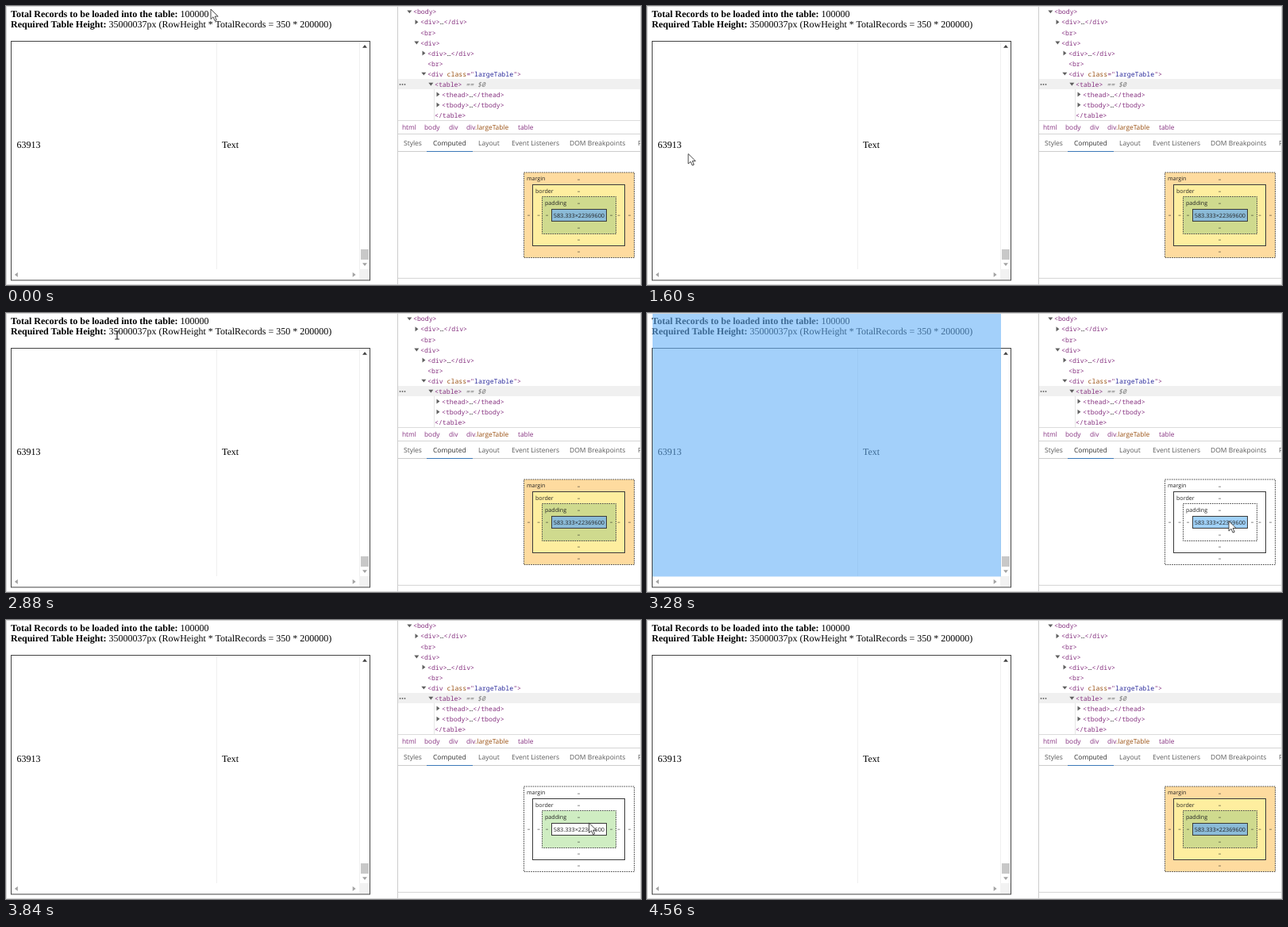
These frames come from a looping animation (800 by 352 pixels, 4640 ms). An HTML page:

```html
<!DOCTYPE html>
<html lang="en">
<head>
<meta charset="utf-8">
<title>Table height inspector</title>
<style>
  html, body { margin: 0; width: 100%; height: 100%; overflow: hidden; background: #fff; }
  svg { display: block; text-rendering: geometricPrecision; }
  text { white-space: pre; }
  .page { font: 12px "Liberation Serif", serif; }
  .code { font: 8.2px "Noto Sans Mono", monospace; fill: #85307f; }
  .crumb { font: 8.35px "Open Sans", sans-serif; fill: #85307f; }
  .tab { font: 8.5px "Open Sans", sans-serif; fill: #5a5a5a; }
  .box { font: 7.1px "Open Sans", sans-serif; fill: #222; }
  .mid { text-anchor: middle; }
  .attr { fill: #994f10; }
  .value { fill: #2a2a9c; }
  .dim { fill: #333; }
  .note { fill: #777; font-style: italic; }
</style>
</head>
<body>
<svg id="stage" width="800" height="352" viewBox="0 0 800 352"></svg>
<script>
const stage = document.getElementById('stage');
const parts = [];
const rect = (x, y, w, h, fill, more = '') =>
  parts.push(`<rect x="${x}" y="${y}" width="${w}" height="${h}" fill="${fill}" ${more}/>`);
const text = (cls, x, y, body) => parts.push(`<text class="${cls}" x="${x}" y="${y}">${body}</text>`);
const tri = (x, y, turn, size, fill) =>
  parts.push(`<path d="M-${size} -${size * .6}H${size}L0 ${size * .7}Z" fill="${fill}" transform="translate(${x} ${y}) rotate(${turn})"/>`);
const span = (cls, s) => `<tspan class="${cls}">${s}</tspan>`;
const tag = s => `&lt;${s}&gt;`;
const folded = s => tag(s) + span('dim', '…') + tag('/' + s);

// Page and table
text('page', 6, 14, '<tspan font-weight="bold">Total Records to be loaded into the table:</tspan> 100000');
text('page', 6, 27.3, '<tspan font-weight="bold">Required Table Height:</tspan> 35000037px (RowHeight * TotalRecords = 350 * 200000)');
rect(6.5, 44.5, 452, 301.5, '#fff', 'stroke="#444"');
rect(265, 45, 1, 287, '#efefef');
rect(445, 45, 1, 287, '#efefef');
text('page', 13.5, 178.6, '63913');
text('page', 272, 178.6, 'Text');
rect(445, 332, 13, 13, '#f2f2f2');
rect(447, 307, 10, 13, '#c8c8c8');
tri(452, 51, 180, 3, '#444');
tri(452, 326, 0, 3, '#a3a3a3');
tri(13, 339, 90, 3, '#a3a3a3');
tri(438.5, 339, -90, 3, '#a3a3a3');
parts.push('<rect id="shade" x="7" y="1" width="439" height="331.5" fill="#66b1f7" opacity=".6"/>');

// Element tree: indent, arrow turn (null for none), content
rect(493, 0, 307, 352, '#fff');
rect(493, 0, 1, 352, '#ccc');
rect(494, 92, 306, 13, '#f0f0f0');
rect(539, 105, 1, 39, '#e6e6e6');
const OPEN = 0, SHUT = -90;
[
  [513, OPEN, tag('body')],
  [522, SHUT, folded('div')],
  [522, null, tag('br')],
  [522, OPEN, tag('div')],
  [531, SHUT, folded('div')],
  [531, null, tag('br')],
  [531, OPEN, `&lt;div ${span('attr', 'class')}="${span('value', 'largeTable')}"&gt;`],
  [540, OPEN, tag('table') + span('note', ' == $0')],
  [549, SHUT, folded('thead')],
  [549, SHUT, folded('tbody')],
  [540, null, tag('/table')]
].forEach(([x, turn, body], i) => {
  const y = 10.4 + i * 13.05;
  text('code', x, y, body);
  if (turn !== null) tri(x - 4.7, y - 3.2, turn, 3, '#606060');
});
[496.5, 499.5, 502.5].forEach(x => parts.push(`<circle cx="${x}" cy="99" r=".9" fill="#666"/>`));

// Breadcrumbs and tabs
rect(494, 144, 306, 1, '#dcdcdc');
rect(494, 161, 306, 1, '#d4d4d4');
[[499, 'html'], [527, 'body'], [558, 'div'], [580, 'div' + span('attr', '.largeTable')], [645, 'table']]
  .forEach(([x, s]) => text('crumb', x, 156, s));
rect(494, 183, 306, 1, '#ccc');
rect(530, 183, 58, 1, '#3c78b8');
[[501, 'Styles'], [538, span('dim', 'Computed')], [595, 'Layout'], [637, 'Event Listeners'], [710, 'DOM Breakpoints'], [796, 'Properties']]
  .forEach(([x, s]) => text('tab', x, 176.3, s));
rect(494, 343, 306, 1, '#d5d5d5');

// Box model: x, y, w, h, normal fill, hover fill, dashed
const layers = [
  [652.5, 210, 139, 107.5, '#fedb9f', '#ffdca8', 1],
  [663.5, 225.5, 116, 77, '#feee9f', '#fff0b0', 0],
  [675.5, 240.5, 93, 47, '#cfda8e', '#cfedc2', 1],
  [687.5, 256.5, 69, 15, '#8bbbd8', '#a0d1f8', 0]
];
layers.forEach(([x, y, w, h, fill, , dash], i) => {
  rect(x, y, w, h, fill, `class="layer" stroke="${dash ? '#484848' : '#3a3a3a'}" ${dash ? 'stroke-dasharray="1.6 1.2"' : ''}`);
  if (i > 2) return;
  text('box', x + 3.5, y + 10.4, ['margin', 'border', 'padding'][i]);
  const side = [6, 7.5, 6][i];
  [[721.5, y + 8.3], [721.5, y + h - 7.7], [x + side, 264], [x + w - side, 264]]
    .forEach(([cx, cy]) => text('box mid', cx, cy + 2.3, '–'));
});
parts.push('<text class="box mid" style="font-size:7.25px" x="721.9" y="266.7">583.333×22369600</text>');
rect(.5, .5, 799, 351, 'none', 'stroke="#d4d4d4"');

// Pointers
parts.push(`<path id="arrow" d="M0 0V12.6L3 9.8L5.1 14.6L7.2 13.7L5.2 9.1H9.2Z" fill="#fff" stroke="#333" stroke-width=".9"/>
  <path id="beam" d="M-2.8 -5H2.8M0 -5V5M-2.8 5H2.8" fill="none" stroke="#222" stroke-width="1.2"/>`);
stage.innerHTML = parts.join('');

const [shade, arrow, beam] = ['shade', 'arrow', 'beam'].map(id => document.getElementById(id));
const boxes = [...document.querySelectorAll('.layer')];

// Pointer path: time, x, y
const path = [
  [0, 258, 4], [240, 252, 8], [560, 219, 9], [880, 110, 9], [1120, 42, 13],
  [1200, 6, 31], [1440, 40, 150], [1600, 52, 186.5], [1680, 53, 172], [1760, 62, 148],
  [2000, 130, 60], [2240, 203, 11], [2400, 243, 14], [2560, 200, 30], [2720, 124, 28],
  [2880, 140, 28], [3040, 400, 92], [3120, 600, 190], [3200, 712, 252], [3280, 733, 262.5],
  [3600, 723.5, 269.5], [3760, 731, 262], [3840, 734.5, 256], [4000, 735, 262], [4160, 728, 268],
  [4240, 722, 282], [4320, 716, 306], [4400, 713, 333]
];
const LOOP = 4640, STEP = 80, EXIT = 4440;

function pointerAt(t) {
  const i = Math.max(1, path.findIndex(p => p[0] >= t));
  const [a, b] = [path[i - 1], path[i]];
  const k = (t - a[0]) / (b[0] - a[0]);
  return [a[1] + (b[1] - a[1]) * k, a[2] + (b[2] - a[2]) * k];
}

function draw(now) {
  const t = Math.floor(now % LOOP / STEP) * STEP;
  const gone = t > EXIT;
  const [x, y] = gone ? [-50, -50] : pointerAt(t);
  const onText = x > 6 && y < 29.5 && x < (y < 17 ? 256 : 411);
  for (const [el, on] of [[arrow, !onText && !gone], [beam, onText && !gone]]) {
    el.setAttribute('transform', `translate(${x} ${y})`);
    el.style.display = on ? '' : 'none';
  }
  let hover = -1;
  layers.forEach(([lx, ly, w, h], i) => {
    if (x >= lx && x <= lx + w && y >= ly && y <= ly + h) hover = i;
  });
  boxes.forEach((el, i) =>
    el.setAttribute('fill', hover < 0 ? layers[i][4] : hover === i ? layers[i][5] : '#fff'));
  // The page overlay drops out briefly while the pointer lingers
  shade.style.display = hover === 3 && (t < 3520 || t >= 3960) ? '' : 'none';
}

const start = performance.now();
function tick() {
  draw(performance.now() - start);
  requestAnimationFrame(tick);
}
tick();
</script>
</body>
</html>
```
